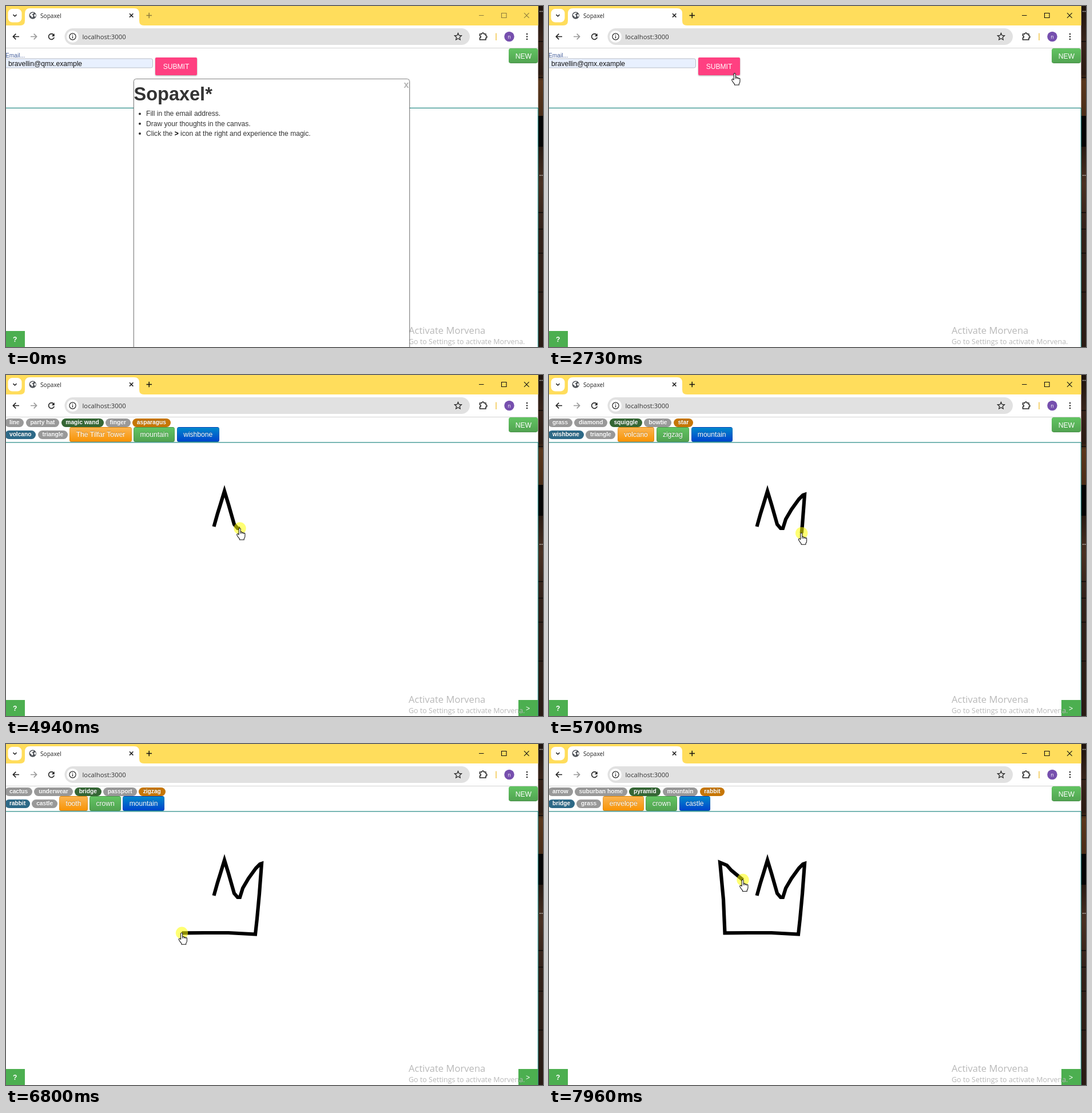
Animation of 939 by 596 pixels, one loop 8 s. Source, as an HTML page:

```html
<!DOCTYPE html>
<html lang="en">
<head>
<meta charset="utf-8">
<title>Sketch guessing</title>
<style>
  html, body { margin: 0; width: 100%; height: 100%; overflow: hidden; background: #fff; }
  #stage { position: relative; width: 939px; height: 596px; overflow: hidden; background: #fff; }
  svg { position: absolute; left: 0; top: 0; }
  text { font-family: "Liberation Sans", Arial, sans-serif; font-size: 12.08px; white-space: pre; }
  .ui { font-family: "Open Sans", sans-serif; }
  .white { fill: #fff; }
  .icon { fill: none; stroke: #222; stroke-width: 1.6; }
  #caption { fill: none; stroke: #111; stroke-width: 1.1; }
  #caption.idle { stroke: #8d7b3c; }
  .labels { position: absolute; left: -1.8px; top: 76px; font: 12.08px "Liberation Sans", Arial, sans-serif; color: #fff; }
  .row { display: flex; align-items: center; gap: 3.36px; white-space: nowrap; }
  .row span { text-shadow: 0 -1px rgba(0, 0, 0, .25); }
  .pill { font-size: 10.21px; font-weight: bold; line-height: 12.1px; padding: .9px 7.76px 1.7px; border-radius: 7.8px; background: #999; }
  .btn { box-sizing: border-box; height: 26px; line-height: 24.3px; padding: 0 10.35px; border: .86px solid rgba(0, 0, 0, .1); border-bottom-color: rgba(0, 0, 0, .25); border-radius: 3.5px; }
  .green { background: #356635; }
  .amber { background: #c67605; }
  .blue { background: #2d6987; }
  .warning { background: linear-gradient(#fbb450, #f89406); }
  .success { background: linear-gradient(#62c462, #51a351); }
  .primary { background: linear-gradient(#08c, #04c); }
  .row + .row { margin-top: .6px; }
</style>
</head>
<body>
<div id="stage">
  <svg width="939" height="596" viewBox="0 0 939 596">
    <defs>
      <linearGradient id="leaf" x2="0" y2="1"><stop stop-color="#62c462"/><stop offset="1" stop-color="#51a351"/></linearGradient>
      <linearGradient id="wood" x2="0" y2="1">
        <stop stop-color="#1d130e"/><stop offset=".1" stop-color="#38231a"/><stop offset=".2" stop-color="#2a1a12"/>
        <stop offset=".22" stop-color="#5a371c"/><stop offset=".32" stop-color="#4a2d18"/><stop offset=".4" stop-color="#241710"/>
        <stop offset=".52" stop-color="#493022"/><stop offset=".64" stop-color="#34221a"/><stop offset="1" stop-color="#291b14"/>
      </linearGradient>
      <filter id="soft" x="-10%" y="-10%" width="120%" height="130%"><feDropShadow dx="0" dy="1" stdDeviation="1.3" flood-opacity=".35"/></filter>
    </defs>

    <!-- desktop edge -->
    <rect x="930.5" width="9" height="596" fill="url(#wood)"/>
    <rect x="930.5" y="192" width="9" height="54" fill="#050404"/>
    <path d="M931 62h8M931 125h8M931 361h8M931 390h8M931 432h8M931 500h8" stroke="#17100c" stroke-width="2"/>
    <path d="M933 9.5h6M933 296h6" stroke="#ddd" stroke-width="1.5" stroke-dasharray="1.3 1.2"/>

    <!-- browser -->
    <rect width="930.5" height="34" fill="#ffdd5c"/>
    <path d="M25 34Q33 34 33 26V13Q33 4 42 4H224Q233 4 233 13V26Q233 34 241 34Z" fill="#fff"/>
    <rect x="3.5" y="5" width="24" height="23.5" rx="7.5" fill="#fff"/>
    <path class="icon" d="M12.5 15.2l3 2.8 3-2.8"/>
    <circle cx="46.7" cy="16.5" r="6.2" fill="#50545a"/>
    <path d="M42 14.5Q45 11 48 11.5 49 13.5 46 14.3 45.5 16 47.8 17 47 19.5 45.5 20.5 45 17.5 42 16.5ZM49 15l3-.5V18l-2 1Z" fill="#fff"/>
    <text class="ui" x="60" y="20.8" style="font-size:10.1px" fill="#222">Sopaxel</text>
    <path class="icon" d="M216 13.2l6.4 6.4m0-6.4l-6.4 6.4"/>
    <g id="caption">
      <path d="M245.5 16.5H255M250.2 11.8V21.2" stroke-width="1.5"/>
      <path d="M827 16.5h8.5M866.5 12.5h8.5v8h-8.5zM906 12.2l8.6 8.6m0-8.6l-8.6 8.6"/>
    </g>
    <path d="M0 73.5H930" stroke="#d2d2d2"/>
    <path class="icon" d="M23 53.5H12.5M17.3 48.6l-4.9 4.9 4.9 4.9"/>
    <path class="icon" d="M43 53.5H53.5M48.7 48.6l4.9 4.9-4.9 4.9" style="stroke:#999"/>
    <path class="icon" d="M83.4 50.6A4.9 4.9 0 1 0 84.2 54.8"/>
    <path d="M84.7 48v5h-5z" fill="#222"/>
    <rect x="102.5" y="39" width="708.5" height="29" rx="14.5" fill="#e1e1e1"/>
    <circle cx="116.5" cy="53.5" r="10.5" fill="#fff"/>
    <circle class="icon" cx="116.5" cy="53.5" r="5.6" style="stroke-width:1.2"/>
    <path class="icon" d="M116.5 52.8v3.8M116.5 50.2v1.4" style="stroke-width:1.3"/>
    <text class="ui" x="133.5" y="57.7" style="font-size:11.3px" fill="#333">localhost:3000</text>
    <path id="star" class="icon" style="stroke-width:1.2"/>
    <path class="icon" d="M828.5 49H832a1.9 1.9 0 0 1 3.8 0H839v3a1.9 1.9 0 0 1 0 3.8V59H828.5v-3.4a1.8 1.8 0 0 0 0-3.6z" style="stroke-width:1.5"/>
    <path d="M857 47.5V60" stroke="#f3c955" stroke-width="1.6"/>
    <circle cx="880" cy="53.5" r="8.7" fill="#764fae"/>
    <text class="ui white" x="880" y="56.6" text-anchor="middle" style="font-size:9px">n</text>
    <path d="M911 49v9.1" stroke="#222" stroke-width="2.6" stroke-linecap="round" stroke-dasharray="0 4.5"/>

    <!-- page -->
    <path id="border" fill="none" stroke="#2a8d88" stroke-width="1.2"/>
    <rect x="879" y="74" width="51" height="26" rx="3.5" fill="url(#leaf)"/>
    <path d="M882 99.6H927" stroke="#3f8540" stroke-width=".8"/>
    <text class="white" x="890.7" y="91.5">NEW</text>
    <g id="form">
      <text x="-1" y="89.8" fill="#46609c" style="font-size:10.2px">Email...</text>
      <rect x="-3" y="92" width="259.5" height="16" rx="3" fill="#e8f0fe" stroke="#b9bec8"/>
      <text x="4" y="104.6" fill="#111">bravellin@qmx.example</text>
      <rect x="261" y="90" width="73" height="31" rx="2" fill="#ff4081" filter="url(#soft)"/>
      <text class="white" x="274.7" y="109.6">SUBMIT</text>
    </g>
    <rect y="568" width="33" height="28" fill="#4caf50"/>
    <text class="white" x="12" y="586.6" style="font-weight:bold">?</text>
    <g id="next">
      <rect x="896" y="568" width="34" height="28" fill="#4caf50"/>
      <text class="white" x="909" y="586.6">&gt;</text>
    </g>
    <g fill="#b9b9b9">
      <text class="ui" x="704" y="573" style="font-size:16.6px">Activate Morvena</text>
      <text class="ui" x="704" y="591" style="font-size:12.5px">Go to Settings to activate Morvena.</text>
    </g>
    <g id="modal">
      <rect x="223.5" y="127.5" width="482" height="500" rx="4" fill="#fff" stroke="#8a8a8a" filter="url(#soft)"/>
      <text x="223.5" y="165" fill="#333" style="font-size:32.5px;font-weight:bold">Sopaxel*</text>
      <text x="700" y="143" text-anchor="middle" fill="#b3b3b3" style="font-size:16px;font-weight:bold">x</text>
      <path d="M234 188.5v34.6" stroke="#333" stroke-width="4" stroke-linecap="round" stroke-dasharray="0 17.25"/>
      <g fill="#333">
        <text x="245" y="192.3">Fill in the email address.</text>
        <text x="245" y="209.6">Draw your thoughts in the canvas.</text>
        <text x="245" y="226.8">Click the <tspan font-weight="bold" fill="#000">&gt;</tspan> icon at the right and experience the magic.</text>
      </g>
    </g>
  </svg>

  <svg width="939" height="596" viewBox="0 0 939 596" style="z-index:1">
    <polyline id="ink" fill="none" stroke="#000" stroke-width="6.2" stroke-miterlimit="5"/>
    <g id="pointer">
      <circle id="press" r="10.7" fill="#ff0" fill-opacity=".55"/>
      <path id="arrow" d="M.5 .5V14.2L3.6 11.2 5.9 16.4 8.1 15.4 5.8 10.4H10Z" fill="#fff" stroke="#111"/>
      <path id="hand" transform="scale(.95)" fill="#fff" stroke="#111" stroke-width="1.1"
        d="M-2 12V1.2Q-2-.4-.4-.4T1.2 1.2V7Q4 5.4 4 8.6 6.8 6.4 6.8 9.6 9.4 7.6 9.4 10V14.5Q9.4 17 7.6 19V21H-.6V19.4Q-3.4 16.4-5.4 12.6-6 10.6-4.5 10.2T-2 12M1.2 7v3M4 8v2"/>
    </g>
  </svg>
</div>

<script>
const LOOP = 8000;
const $ = id => document.getElementById(id);
const show = (el, on) => { el.style.display = on ? '' : 'none'; };

// Each move: start, end, number of equal steps, then the corners of its path.
const START = [870, 655];
const travel = [
  [130, 380, 4, [690, 265], [658, 217]],
  [610, 1160, 8, [649, 192], [680, 150], [697, 135]],
  [1730, 2260, 8, [325, 118]],
  [3190, 3420, 4, [363.5, 265]]
];
const drawing = [
  [3740, 3970, 4, [370, 242]],
  [4050, 4520, 7, [375, 226], [382, 203], [389, 226]],
  [4830, 4910, 2, [399, 261], [405, 268], [409, 268]],
  [4978, 5630, 10, [414, 252], [424, 235], [437, 217], [444, 210], [447, 209], [443, 262]],
  [5700, 6490, 11, [439, 305], [436, 332.5], [389, 330], [348, 330]],
  [6570, 6800, 4, [307.5, 330.3]],
  [6950, 7430, 7, [305, 272], [302.5, 245]],
  [7580, 7750, 3, [299, 207], [311, 212], [319, 221]],
  [7890, 7960, 2, [339, 237.5]]
];
const DRAW_START = drawing[0][0];

const guesses = [
  [4650, 'line,party hat,magic wand,finger,asparagus,volcano,triangle,The Tilfar Tower,mountain,wishbone'],
  [5270, 'grass,diamond,squiggle,bowtie,star,wishbone,triangle,volcano,zigzag,mountain'],
  [6130, 'cactus,underwear,bridge,passport,zigzag,rabbit,castle,tooth,crown,mountain'],
  [7160, 'arrow,suburban home,pyramid,mountain,rabbit,bridge,grass,envelope,crown,castle']
];
const looks = ['pill', 'pill', 'pill green', 'pill', 'pill amber', 'pill blue', 'pill',
  'btn warning', 'btn success', 'btn primary'];

const labelSets = guesses.map(([, words]) => {
  const tags = words.split(',').map((w, i) => `<span class="${looks[i]}">${w}</span>`);
  const box = document.createElement('div');
  box.className = 'labels';
  box.innerHTML = [tags.slice(0, 5), tags.slice(5)]
    .map(row => `<div class="row">${row.join('')}</div>`).join('');
  $('stage').append(box);
  return box;
});

const starPoints = Array.from({ length: 10 }, (_, i) => {
  const r = i % 2 ? 2.9 : 6.4, a = (i / 5 - .5) * Math.PI;
  return [790.5 + r * Math.cos(a), 53.8 + r * Math.sin(a)];
});
$('star').setAttribute('d', `M${starPoints.join('L')}Z`);

// Points passed by time t, ending at the current position.
function trace(moves, origin, t) {
  const passed = [origin];
  for (const [from, to, count, ...corners] of moves) {
    if (t < from) break;
    const step = Math.min(count, Math.floor((t - from) / (to - from) * (count - 1) + 1e-6) + 1);
    const path = [passed.at(-1), ...corners];
    const lengths = corners.map(([x, y], i) => Math.hypot(x - path[i][0], y - path[i][1]));
    let left = lengths.reduce((a, b) => a + b) * step / count;
    for (let i = 0; i < corners.length && left > 1e-6; i++) {
      const k = Math.min(1, left / lengths[i]);
      passed.push([0, 1].map(j => path[i][j] + (path[i + 1][j] - path[i][j]) * k));
      left -= lengths[i];
    }
  }
  return passed;
}

function render(t) {
  const within = (a, b) => t >= a && t < b;
  const arrival = trace(travel, START, t).at(-1);
  const ink = trace(drawing, arrival, t);
  const formOpen = t < 2735;
  const onHand = t >= 2225;

  $('caption').setAttribute('class', t < 1500 ? 'idle' : '');
  show($('modal'), t < 1576);
  show($('form'), formOpen);
  show($('next'), t >= 4610);
  $('border').setAttribute('d', `M0 ${formOpen ? 178.3 : 117.8}H930.3V597`);

  const current = guesses.filter(([start]) => t >= start).length - 1;
  labelSets.forEach((box, i) => show(box, i === current));

  $('ink').setAttribute('points', ink.join(' '));
  show($('pointer'), t >= 130);
  $('pointer').setAttribute('transform', `translate(${ink.at(-1)})`);
  show($('arrow'), !onHand);
  show($('hand'), onHand);
  show($('press'), t >= DRAW_START || within(1500, 1576) || within(2340, 2410));
}

function tick() {
  render(performance.now() % LOOP);
  requestAnimationFrame(tick);
}
tick();
</script>
</body>
</html>
```
